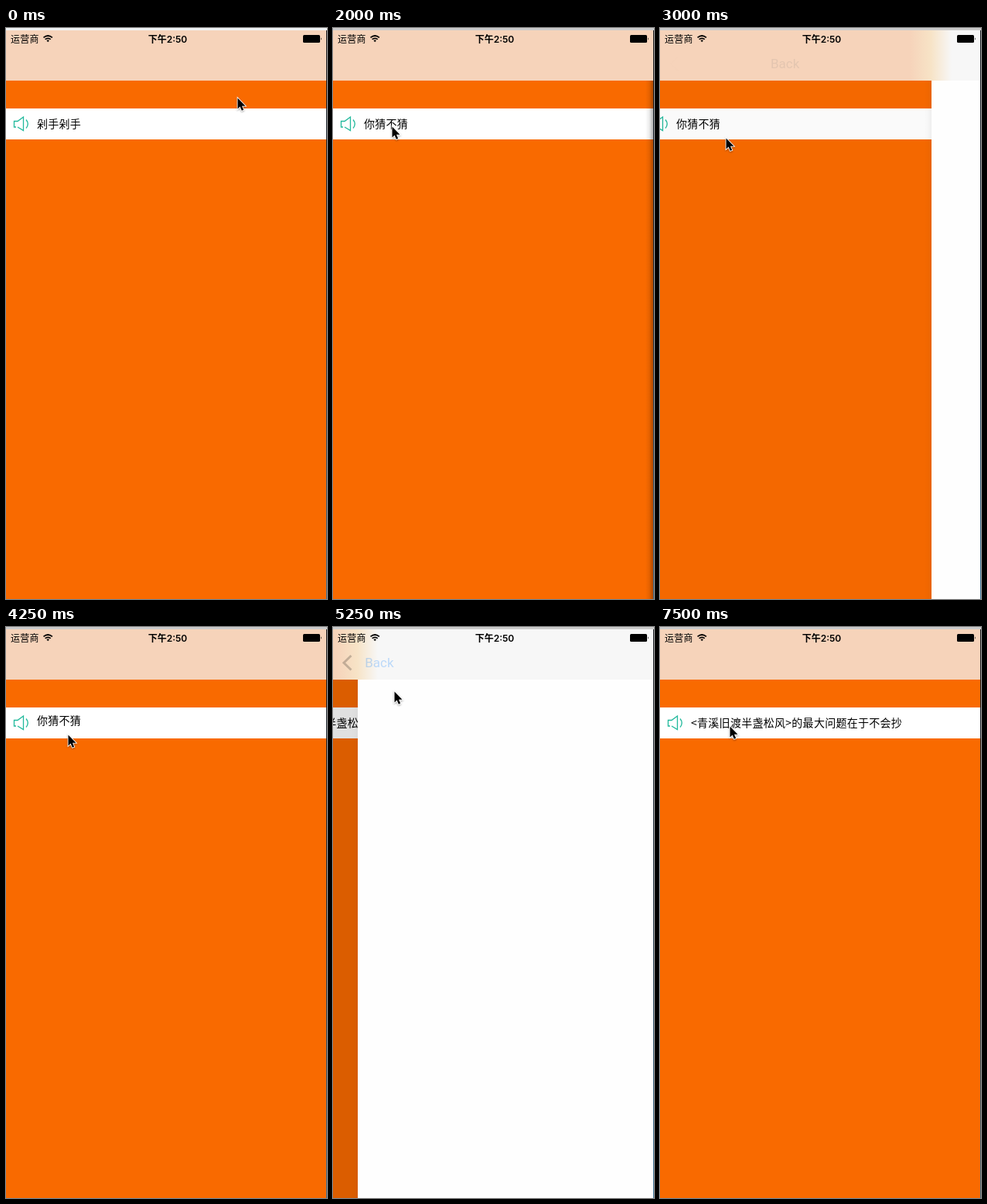
Animation, 415 px wide and 738 px high, one loop 8000 ms. Source, as an HTML page:

```html
<!DOCTYPE html>
<html lang="zh">
<head>
<meta charset="utf-8">
<style>
  html, body { margin: 0; width: 100%; height: 100%; overflow: hidden; }
  svg { display: block; }
  text { font-family: Inter, "Noto Sans CJK SC", "Noto Sans CJK", sans-serif; white-space: pre; }
  .news text { font: 14px "Noto Sans CJK SC", "Noto Sans CJK", sans-serif; letter-spacing: .28px; }
</style>
</head>
<body>
<svg width="415" height="738" viewBox="0 0 415 738">
  <defs>
    <clipPath id="stage"><rect width="414" height="738"/></clipPath>
    <clipPath id="banner"><rect y="104" width="414" height="40"/></clipPath>
    <linearGradient id="barFill" gradientUnits="userSpaceOnUse">
      <stop stop-color="#f6d3ba"/>
      <stop offset=".5" stop-color="#f7e3c6"/>
      <stop offset="1" stop-color="#f7f7f7"/>
    </linearGradient>
    <linearGradient id="shade">
      <stop stop-color="#000" stop-opacity="0"/>
      <stop offset=".5" stop-color="#000" stop-opacity=".08"/>
      <stop offset="1" stop-color="#000" stop-opacity=".32"/>
    </linearGradient>
    <linearGradient id="desktop" x2="0" y2="1">
      <stop stop-color="#15171c"/>
      <stop offset=".5" stop-color="#1d3040"/>
      <stop offset="1" stop-color="#3c7296"/>
    </linearGradient>
    <filter id="soft" x="-50%" y="-50%" width="200%" height="200%">
      <feDropShadow dx="0" dy="1" stdDeviation="1" flood-opacity=".4"/>
    </filter>
  </defs>

  <g clip-path="url(#stage)">
    <rect width="415" height="738" fill="#f96a00"/>
    <g id="home">
      <rect y="104" width="540" height="40" fill="#fff"/>
      <g fill="none" stroke="#22b99c" stroke-width="1.3">
        <path d="M13 128H10.5V120.5H15L22.5 115V132.5L15 128"/>
        <path d="M26 118.5q4.5 5.5 0 11"/>
      </g>
      <g class="news" clip-path="url(#banner)">
        <g id="lines">
          <text x="40" y="129">剁手剁手</text>
          <text x="40" y="169">你猜不猜</text>
          <text x="40" y="209">&lt;青溪旧渡半盏松风&gt;的最大问题在于不会抄</text>
        </g>
      </g>
    </g>
    <rect id="dim" width="415" height="738"/>
    <g id="page">
      <rect id="edge" x="-10" y="68" width="10" height="670" fill="url(#shade)"/>
      <rect y="68" width="415" height="670" fill="#fefefe"/>
    </g>
    <rect y="3" width="415" height="65" fill="url(#barFill)"/>
    <path id="chevron" d="M23.5 37L14 46.3L23.5 55.5" fill="none" stroke-width="3"/>
    <text id="back" y="52" font-size="17" style="font-family:Roboto,sans-serif">Back</text>
  </g>

  <rect id="strip" width="415" height="3"/>
  <rect x="414" y="3" width="1" height="735" fill="url(#desktop)"/>

  <text x="6" y="19" font-size="12" letter-spacing=".2">运营商</text>
  <g fill="none" stroke="#000" stroke-width="1.7">
    <path d="M48.5 12.3q5.7-4.6 11.4 0M50.6 14.7q3.6-2.8 7.2 0"/>
    <path d="M52.4 16L54.2 18.2L56 16Q54.2 14.9 52.4 16Z" fill="#000" stroke="none"/>
  </g>
  <text x="209" y="19" font-size="12" font-weight="600" text-anchor="middle">下午2:50</text>
  <rect x="384" y="9" width="22" height="10" rx="1.5"/>
  <path d="M407 12.2q1.6 1.8 0 3.6z"/>

  <path id="cursor" d="M.5 .5V14.5L3.6 11.6L5.8 16.8L8.2 15.8L6 10.8H10.5Z"
        stroke="#fff" stroke-width="1.6" paint-order="stroke" filter="url(#soft)"/>
</svg>
<script>
const LOOP = 8000, STEP = 250, WIDTH = 414;
const $ = id => document.getElementById(id);
const set = (id, attrs) => {
  for (const name in attrs) $(id).setAttribute(name, attrs[name]);
};

// [start, is push]
const transitions = [[2000, true], [2816, false], [5019, true], [5784, false]];

// [time, x, y] of the pointer tip
const pointer = [
  [0, 299, 90], [250, 322, 80], [500, 340, 98], [750, 347, 118], [1250, 347, 118],
  [1750, 76, 127], [2000, 76, 127], [2500, 50, 46], [2750, 50, 44], [3000, 85, 142],
  [3250, 88, 148], [3750, 80, 139], [5000, 80, 139], [5250, 79, 83], [5500, 57, 43],
  [6000, 57, 43], [6500, 60, 48], [7500, 90, 128], [LOOP, 90, 128]
];

function pointerAt(t) {
  const i = pointer.findIndex(key => key[0] > t);
  const [t0, x0, y0] = pointer[i - 1], [t1, x1, y1] = pointer[i];
  const u = (t - t0) / (t1 - t0);
  return [x0 + (x1 - x0) * u, y0 + (y1 - y0) * u];
}

function smooth(u) {
  u = Math.min(1, Math.max(0, u));
  return u * u * (3 - 2 * u);
}

// Critically damped spring: what is left of the way after dt ms
function remaining(dt) {
  const w = dt * .01826;
  return dt > 400 ? 0 : (1 + w) * Math.exp(-w);
}

function navigation(t) {
  const current = transitions.filter(([start]) => start <= t).pop();
  if (!current) return { shown: 0, shadow: 0 };
  const rest = remaining(t - current[0]);
  return { shown: current[1] ? 1 - rest : rest, shadow: rest };
}

function draw(t) {
  const { shown, shadow } = navigation(t);
  const x = Math.round(WIDTH * (1 - shown));
  const settled = shown === 1;
  const barEdge = shown === 0 ? WIDTH + 40 : settled ? -40 : x;
  const scroll = smooth((t - 173) / 450) + smooth((t - 4173) / 450);

  set('home', { transform: `translate(${Math.round(-.3 * WIDTH * shown)})` });
  set('lines', { transform: `translate(0 ${Math.round(-40 * scroll)})` });
  set('dim', { opacity: .13 * shown });
  set('page', { transform: `translate(${x})` });
  set('edge', { opacity: shadow });
  set('barFill', { x1: barEdge - 28, x2: barEdge + 26 });
  set('chevron', { stroke: settled ? '#007aff' : '#000', opacity: settled ? 1 : .25 * shown ** 2 });
  set('back', {
    x: 31 + 132 * (1 - shown),
    fill: shown > .5 ? '#007aff' : '#777',
    opacity: settled ? 1 : shown && .12 + .13 * shown
  });
  set('strip', { fill: t < 1750 ? '#f0f3f4' : '#cbcbcb' });
  set('cursor', { transform: `translate(${pointerAt(t)})` });
}

function tick() {
  const t = performance.now() % LOOP;
  draw(Math.floor(t / STEP) * STEP);
  requestAnimationFrame(tick);
}
tick();
</script>
</body>
</html>
```
